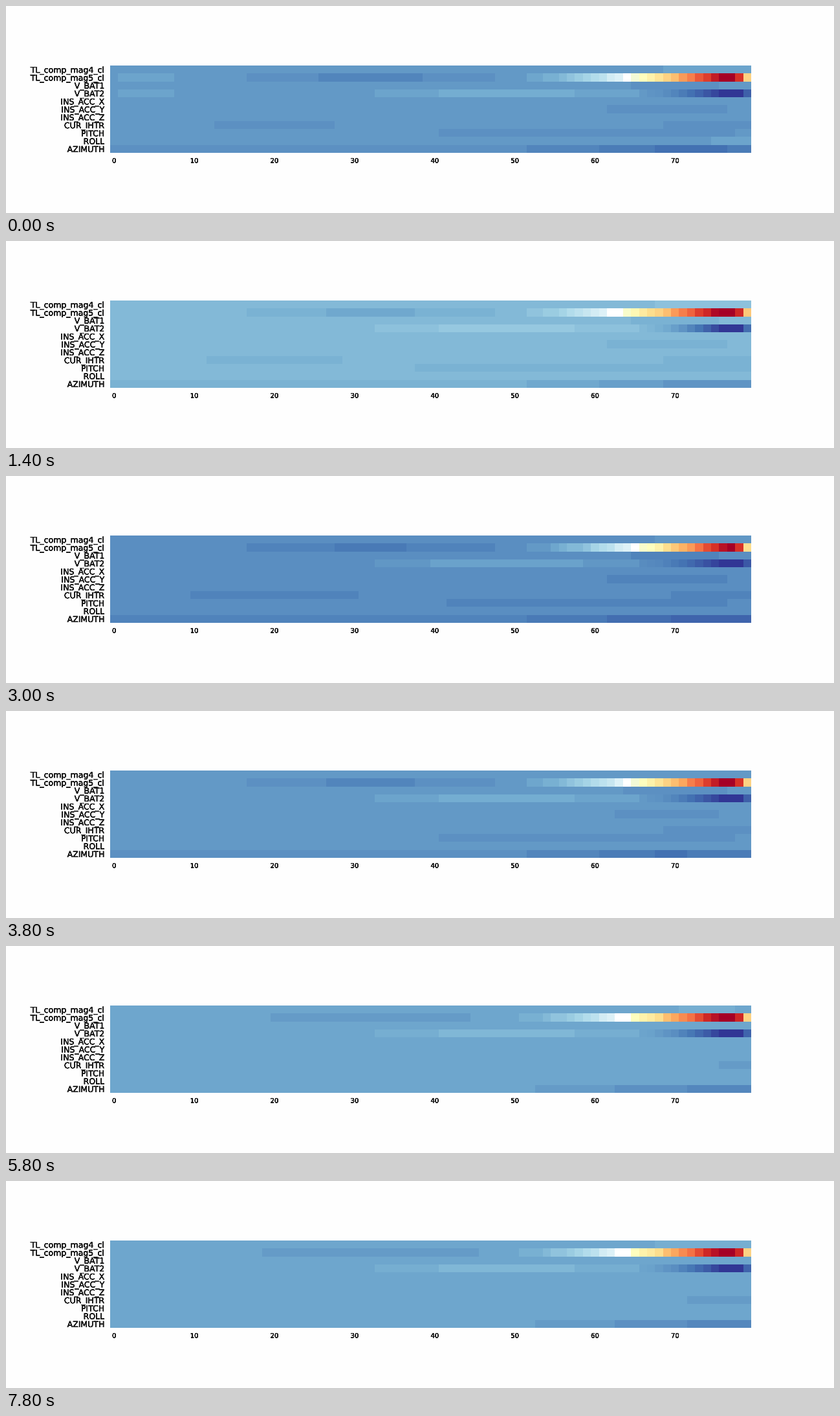
Animation of 1280 by 320 pixels, one loop 8 s. Source, as a matplotlib script:

```python
import numpy as np
import matplotlib.pyplot as plt
from matplotlib.animation import FuncAnimation
from matplotlib.patheffects import Normal

W, H, DPI = 1280, 320, 90
FRAMES, INTERVAL = 40, 200
COLS = 80
STEP = 1 / 48            # one colour level
PAPER = "#fefefe"
LABELS = ["TL_comp_mag4_cl", "TL_comp_mag5_cl", "V_BAT1", "V_BAT2",
          "INS_ACC_X", "INS_ACC_Y", "INS_ACC_Z", "CUR_IHTR",
          "PITCH", "ROLL", "AZIMUTH"]
MAG4, MAG5, BAT1, BAT2, _, ACC_Y, _, CUR, PITCH, ROLL, AZIMUTH = range(11)

# Row, height in colour levels, centre cell and width of each soft swell.
SWELLS = [
    (MAG4, .55, 74, 12),
    (MAG5, -1.7, 32, 14),
    (BAT1, -.9, 70, 8),
    (BAT2, 2.4, 49, 13),
    (ACC_Y, -.9, 69, 9),
    (CUR, -1.2, 80, 12),
    (CUR, -.6, 20, 18),
    (PITCH, -.9, 59, 26),
    (AZIMUTH, -3.1, 77, 19),
    (AZIMUTH, -.9, 30, 60),
]
OPENING = [(MAG5, 4), (BAT2, 4), (ROLL, 78)]   # bright only at the start

cells = np.arange(COLS)
cmap = plt.get_cmap("RdYlBu_r")
rng = np.random.default_rng(4)
rates = rng.integers(2, 7, len(SWELLS))
phases = rng.uniform(0, 2 * np.pi, len(SWELLS))


def snap(v):
    return np.round(v / STEP) * STEP


def swell(height, centre, width):
    """A bell curve cut into whole colour levels."""
    bell = height * np.exp(-((cells - centre) / width) ** 2)
    return .85 * STEP * np.round(bell)


def rise(shift):
    """Slow climb to the hot peak, then a short fall."""
    climb = np.clip((cells + shift - 48) / 28, 0, 1) ** 2.05
    return climb - .115 * np.maximum(cells - 77, 0) ** 2


def dip():
    climb = np.clip((cells - 65) / 11, 0, 1) ** 1.9
    return climb - .4 * np.maximum(cells - 78, 0)


def picture(i):
    base = np.interp(i, (0, 4, 11, 15, 19, 29),
                     (.168, .227, .227, .147, .166, .187))
    opening = max(0, 1 - i / 4)
    fade = np.interp(i, (19, 29), (0, .5))
    wobble = .12 * np.sin(2 * np.pi * rates * i / FRAMES + phases)

    # A brighter ground brings the ramp forward.
    hot = base + (1 - base) * rise(np.clip(25 * (base - .17), -.6, .5))
    grid = np.full((len(LABELS), COLS), snap(base))
    grid[MAG5] = snap(hot)
    grid[BAT2] *= 1 - dip()

    for (row, height, centre, width), sway in zip(SWELLS, wobble):
        height += sway
        if height < 0:
            height = min(height + fade, 0)
        grid[row] += swell(height, centre, width)
    for row, centre in OPENING:
        grid[row] += swell(opening, centre, 4.2)

    rgb = cmap(np.clip(grid, 0, 1))[..., :3]
    rgb[MAG5, (hot > .403) & (hot < .461)] = 1   # middle of the scale is white
    return rgb


fig = plt.figure(figsize=(W / DPI, H / DPI), dpi=DPI, facecolor=PAPER)
left, right, top, bottom = 161, 1152, 92, 227
ax = fig.add_axes([left / W, 1 - bottom / H,
                   (right - left) / W, (bottom - top) / H])
image = ax.imshow(picture(0), aspect="auto", interpolation="nearest")
for spine in ax.spines.values():
    spine.set_visible(False)

ax.set_yticks(range(len(LABELS)), LABELS, fontsize=10)
ax.set_xticks(range(0, COLS, 10), range(0, COLS, 10), fontsize=8)
ax.tick_params(length=0, labelfontfamily="DejaVu Sans", labelcolor="#1a1a1a")
ax.tick_params(axis="y", pad=7)
ax.tick_params(axis="x", pad=6)
# Repeated passes harden the edges of the lettering.
for label in ax.get_xticklabels() + ax.get_yticklabels():
    label.set_path_effects([Normal()] * 6)


def update(i):
    image.set_data(picture(i))
    return [image]


anim = FuncAnimation(fig, update, frames=FRAMES, interval=INTERVAL,
                     repeat=True, repeat_delay=0, blit=False)
plt.show()
```
